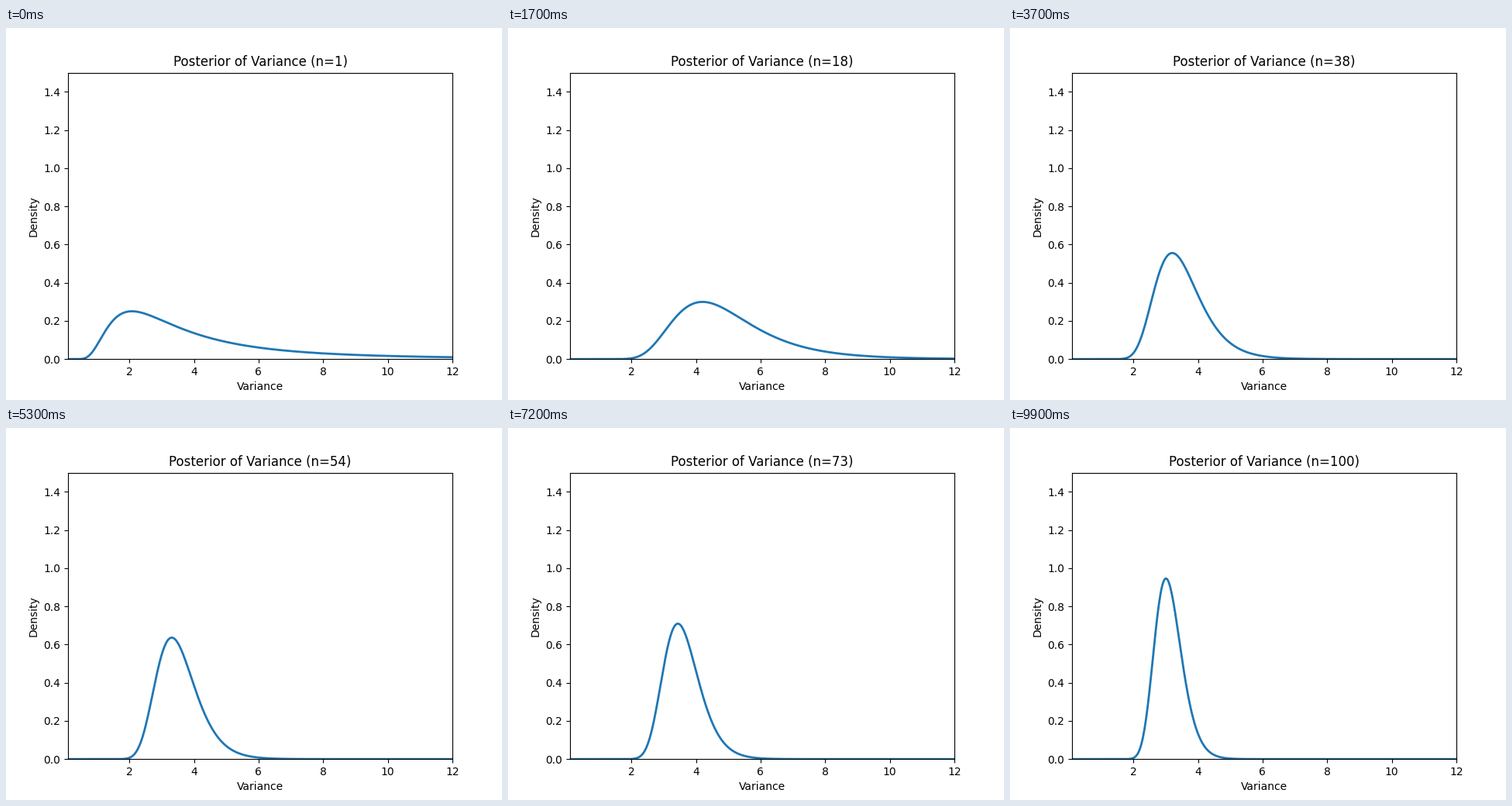
These frames come from a looping animation (640x480 px, 10000 ms). A matplotlib script:

```python
from math import lgamma, log

import matplotlib.pyplot as plt
import numpy as np
from matplotlib.animation import FuncAnimation

N = 100
SIGMA = 2.0
ALPHA0, BETA0 = 2.0, 2.0  # inverse-gamma prior

np.random.seed(1)
samples = np.random.normal(0, SIGMA, N)
half_squares = np.cumsum(samples ** 2) / 2
grid = np.linspace(0.1, 12, 500)


def inv_gamma_pdf(x, a, b):
    return np.exp(a * log(b) - lgamma(a) - (a + 1) * np.log(x) - b / x)


fig, ax = plt.subplots(figsize=(6.4, 4.8), dpi=100)
line, = ax.plot([], [], lw=2)
ax.set_xlim(0.1, 12)
ax.set_ylim(0, 1.5)
ax.set_xlabel("Variance")
ax.set_ylabel("Density")
title = ax.set_title("")


def update(i):
    n = i + 1
    line.set_data(grid, inv_gamma_pdf(grid, ALPHA0 + n / 2, BETA0 + half_squares[i]))
    title.set_text(f"Posterior of Variance (n={n})")
    return line, title


anim = FuncAnimation(fig, update, frames=N, interval=100, repeat=True,
                     repeat_delay=0, init_func=lambda: update(0))
plt.show()
```
